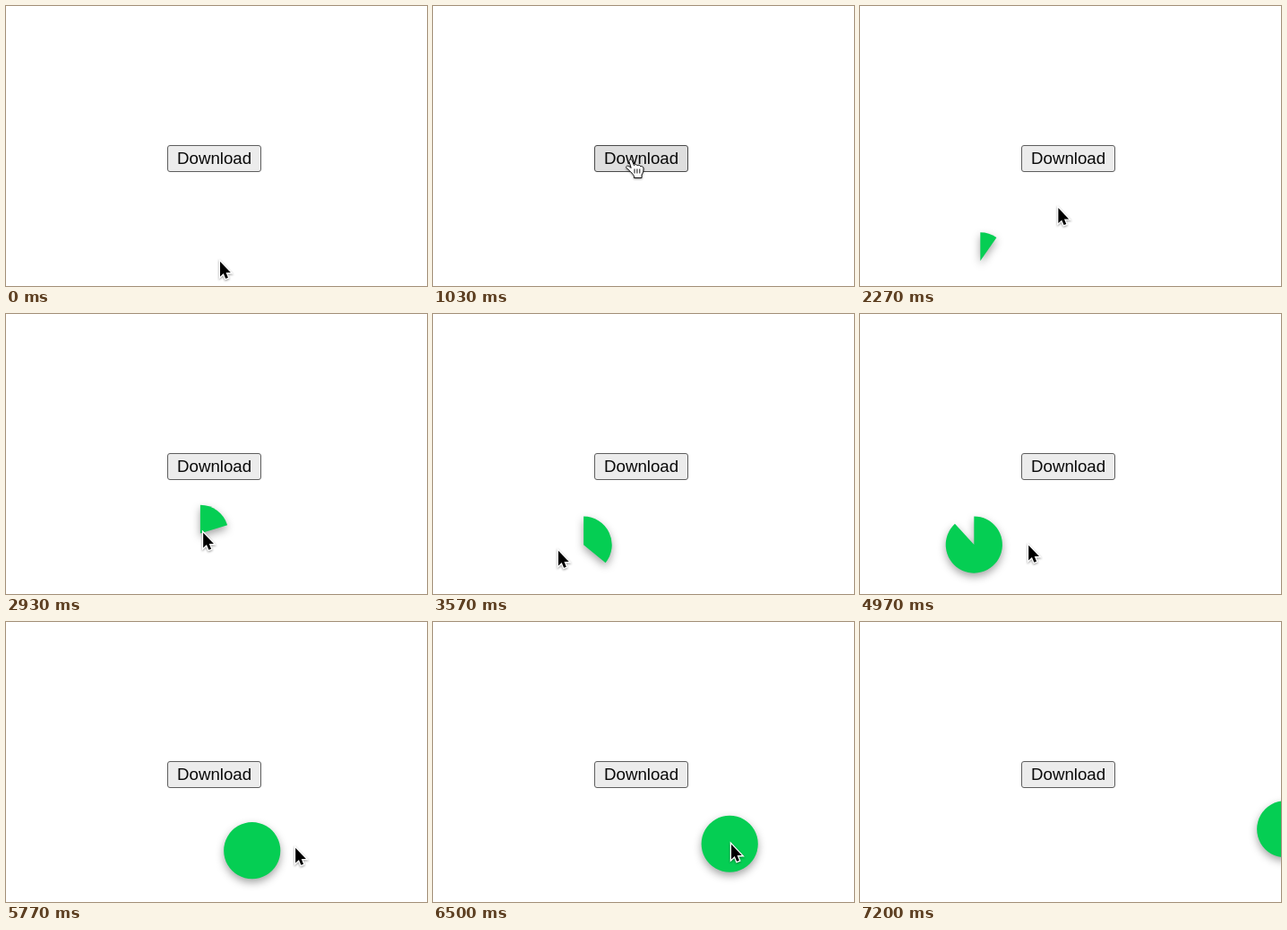
These frames come from a looping animation (470x312 px, 7.23 s). An HTML page:

```html
<!DOCTYPE html>
<html lang="en">
<head>
<meta charset="utf-8">
<title>Download progress follows the pointer</title>
<style>
  html, body { margin: 0; width: 100%; height: 100%; overflow: hidden; background: #fff; }
  svg { display: block; width: 470px; height: 312px; }
  text { font: 18.7px "Liberation Sans", Arial, sans-serif; text-anchor: middle; fill: #0a0a0a; }
  #pie { fill: #05ce53; filter: drop-shadow(0 4px 5px rgba(0, 0, 0, .36)); }
  #arrow, #hand { filter: drop-shadow(0 1.5px 1.3px rgba(0, 0, 0, .4)); }
  #arrow { stroke: #fff; stroke-width: 2.6; paint-order: stroke; }
  #hand { fill: #fff; stroke: #111; stroke-linejoin: round; }
</style>
</head>
<body>
<svg viewBox="0 0 470 312">
  <rect id="button" x="180.5" y="155.5" width="104" height="29" rx="2.5"/>
  <text x="232.6" y="176.4">Download</text>
  <path id="pie"/>
  <g id="pointer">
    <path id="arrow" d="M0 .8V17.6L3.8 14.1 6.2 19.8 8.9 18.7 6.6 13.1H11.8Z"/>
    <g id="hand">
      <path d="M-3 3.5C-3.6 1-.6 .2 .3 2.4L2.4 7.6C3.4 6.2 5.6 6.4 6.2 7.8 7.4 6.9 9.2 7.2 9.7 8.8 11.2 8.2 13 9 13 11 13 14 12.6 15.5 11 18V21.5H2.5V19.5C.8 16.5-1.2 15.2-2.6 13.4L-6 10.6C-7.2 8.6-5 7.4-3 8.8L-.8 10.4Z"/>
      <path d="M3 11.5v5M5.9 11.5v5M8.8 11.5v5"/>
    </g>
  </g>
</svg>
<script>
const LOOP = 7230, PRESS = 1470, RELEASE = 1600, PIE_START = 2095;
const RADIUS = 31.6, FOLLOW = 0.0048; // share of the gap closed per ms
const [button, pie, pointer, arrow, hand] =
  ['button', 'pie', 'pointer', 'arrow', 'hand'].map(id => document.getElementById(id));

// Waypoints of the mouse: time, x, y
const stops = [
  [70, 239, 284], [1030, 222, 170], [1970, 222, 170], [2420, 221, 243], [2980, 220, 243],
  [3570, 140, 263], [4250, 91, 257], [4755, 92, 257], [4970, 188, 257], [5480, 245, 257],
  [5770, 323, 251], [5850, 333, 247], [6820, 333, 247], [7020, 526, 225]
];

// Speed through a waypoint: harmonic mean of both sides, zero at rests and turns
function speed(i, axis) {
  if (i === 0 || i === stops.length - 1) return 0;
  const [before, after] = [i - 1, i].map(k =>
    (stops[k + 1][axis] - stops[k][axis]) / (stops[k + 1][0] - stops[k][0]));
  return before * after > 0 ? 2 * before * after / (before + after) : 0;
}

function mouseAt(t) {
  const next = stops.findIndex(stop => stop[0] > t);
  if (next === 0) return stops[0].slice(1);
  if (next < 0) return stops[stops.length - 1].slice(1);
  const i = next - 1, a = stops[i], b = stops[next];
  const span = b[0] - a[0], u = (t - a[0]) / span, v = 1 - u;
  return [1, 2].map(axis =>
    a[axis] * v * v * (1 + 2 * u) + b[axis] * u * u * (1 + 2 * v) +
    span * u * v * (v * speed(i, axis) - u * speed(next, axis)));
}

// The pie chases the mouse; its trail is worked out once, one point per ms
const trail = [[18, 387]];
for (let t = PIE_START; t < LOOP; t++) {
  const mouse = mouseAt(t), last = trail[trail.length - 1];
  trail.push(last.map((p, axis) => p + (mouse[axis] - p) * FOLLOW));
}

function sector([x, y], degrees) {
  const a = Math.min(degrees, 359.99) * Math.PI / 180;
  const start = degrees < 360 ? `M${x} ${y}L` : 'M';
  return `${start}${x} ${y - RADIUS}A${RADIUS} ${RADIUS} 0 ${+(a > Math.PI)} 1 ` +
    `${x + RADIUS * Math.sin(a)} ${y - RADIUS * Math.cos(a)}Z`;
}

function draw(t) {
  const [x, y] = mouseAt(t);
  const hover = y < 185, pressed = t >= PRESS && t < RELEASE;
  const [fill, stroke] = pressed ? ['#f5f5f5', '#8d8d8d']
    : hover ? ['#dedede', '#4a4a4a'] : ['#ececec', '#5e5e5e'];
  button.setAttribute('fill', fill);
  button.setAttribute('stroke', stroke);
  pointer.setAttribute('transform', `translate(${x} ${y})`);
  arrow.style.display = hover ? 'none' : '';
  hand.style.display = hover ? '' : 'none';

  const age = (t - PIE_START) / 1000;
  const degrees = 28.3 + 34.4 * age + 23 * age * age;
  pie.setAttribute('d', age < 0 ? '' : sector(trail[Math.floor(t - PIE_START)], degrees));
}

const begin = performance.now();
function tick() {
  draw((performance.now() - begin) % LOOP);
  requestAnimationFrame(tick);
}
tick();
</script>
</body>
</html>
```
